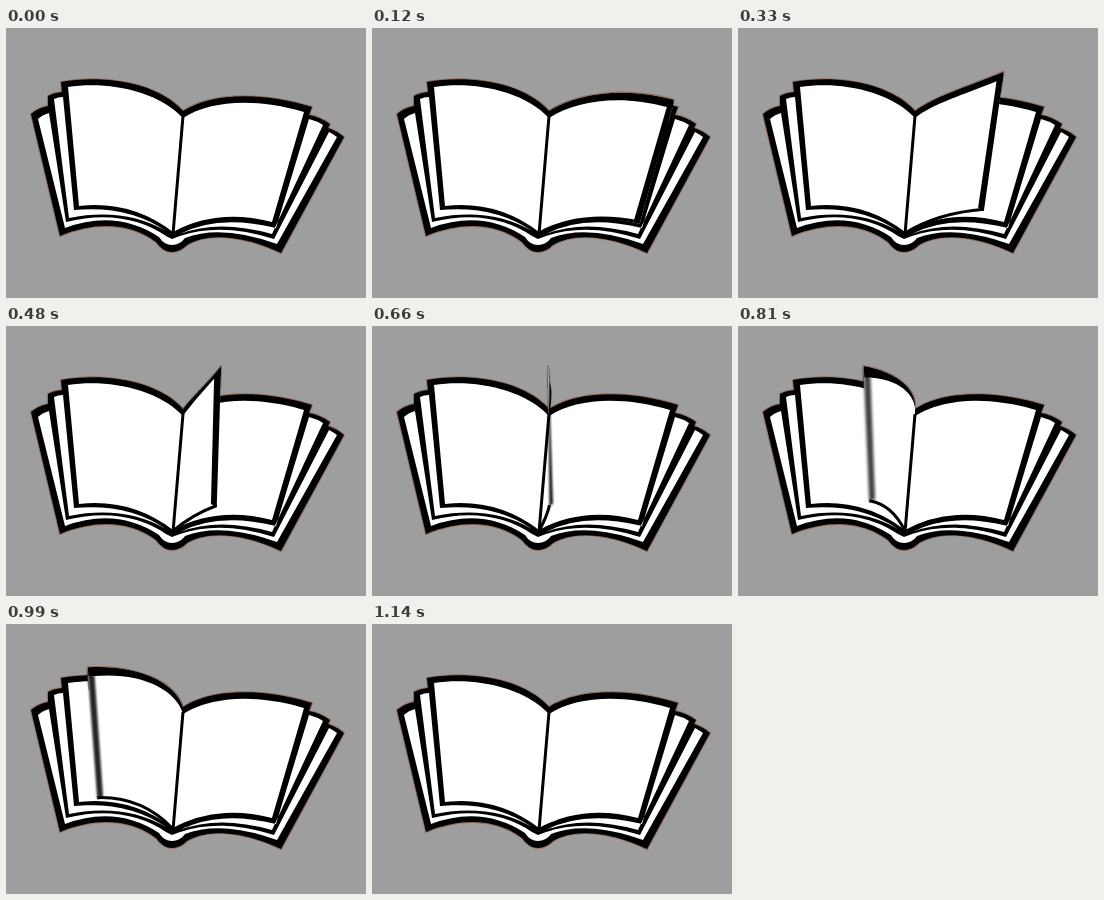
Animation of 360x270 px, one loop 1170 ms. Source, as an HTML page:

```html
<!DOCTYPE html>
<html lang="en">
<head>
<meta charset="utf-8">
<title>Turning page</title>
<style>
html, body { margin: 0; width: 100%; height: 100%; overflow: hidden; background: #9e9e9e; }
svg { display: block; width: 100vw; height: 100vh; }
.rim { stroke: #87533f; stroke-width: 2; stroke-opacity: .65; stroke-linejoin: round; paint-order: stroke; }
.paper { fill: #fff; }
</style>
</head>
<body>
<svg viewBox="0 0 360 270">
  <path class="rim" d="M25 86 Q32 80 42 78 L42 68 Q47 65 56 64 L55 54 C95 47 150 53 177 83
    C205 65 255 63 306 79 L303 87 Q314 89 324 96 L322 100 Q331 103 338 109 L275 225
    C235 206 200 205 181 217 Q174 224 166 224 Q157 224 150 214 C125 195 90 193 54 208 Z"/>
  <g class="paper">
    <path d="M32 91 Q36 87 43 85 L60 194 Q118 180 160 208 L166 211 L174 208 Q215 194 268 211
      L323 104 Q327 106 331 109 L271 216 Q215 196 179 210 Q174 217 166 217 Q158 217 153 209 Q110 181 59 200 Z"/>
    <path d="M48 71 Q52 69 57 69 L68 182 Q122 177 160 203 Q118 179 63 190 Z"/>
    <path d="M303 91 Q311 93 317 97 L266 206 Q212 191 174 206 Q212 186 270 200 Z"/>
    <path d="M62 59 C98 53 150 61 177 90 L167 204 Q125 172 73 178 Z"/>
    <path d="M177 90 C205 72 250 70 298 84 L266 194 Q211 180 167 204 Z"/>
  </g>
  <g id="page">
    <path id="rim" class="rim" fill="none"/>
    <path id="sheet" class="paper"/>
    <path id="foot" fill="none" stroke="#000" stroke-width="3"/>
    <path id="edge"/>
    <path id="band"/>
  </g>
  <path d="M175.5 88 L178.5 88 L168.5 206 L165.5 206 Z"/>
</svg>
<script>
const LOOP = 1170, STEP = 30;
// time in ms and angle of the page in degrees
const TURN = [[0, 0], [210, 26], [480, 74], [660, 92], [810, 116], [990, 142], [1140, 180]];
const $ = id => document.getElementById(id);
const draw = (id, d) => $(id).setAttribute("d", d);

function angle(t) {
  const i = TURN.findIndex(p => p[0] >= t);
  if (i < 1) return i ? Math.PI : 0;
  const [t0, a0] = TURN[i - 1], [t1, a1] = TURN[i];
  return (a0 + (a1 - a0) * (t - t0) / (t1 - t0)) * Math.PI / 180;
}

function render(t) {
  const a = angle(t), c = Math.cos(a), k = Math.abs(c), right = c > 0;
  $("page").style.display = k > .9999 ? "none" : "";

  // blend from the upright page to the flat one on its side of the spine
  const mix = (up, r, l, power = 1) => up + ((right ? r : l) - up) * k ** power;
  const curl = Math.max(0, -Math.sin(2 * a)), soft = Math.sin(a) ** 2;

  const x = 180.5 + 125.5 * c, y = mix(40, 79, 54, 6);
  const lx = x + mix(1, -36, 12, right ? 1.5 : 1), ly = mix(181, 199, 181, 6) - 6 * curl;
  const ax = mix(177, 205, 150, right ? 1 : 2) + 10 * curl, ay = mix(75, 65, 53);
  const bx = mix(178, 255, 95, right ? 1 : 1.5) + 10 * curl, by = mix(60, 58, 47) - 10 * curl;
  const fx = mix(177, 211, 125), fy = mix(191, 182, 177) - 8 * curl;

  const side = right ? -1 : 1, width = 7 * Math.min(1, k * 4);
  const ix = x + side * width, iy = y + 15 - 8 * k;
  const top = `M177 83 C${ax} ${ay} ${bx} ${by} ${x} ${y}`;
  const lower = `Q${fx} ${fy} 167 205`;
  const down = 22 / (ly - y);

  draw("rim", `${top} L${x + (lx - x) * down} ${y + 22}`);
  draw("sheet", `${top} L${lx} ${ly} ${lower} L177 87 Z`);
  draw("foot", `M${lx} ${ly - 1.5} ${lower}`);
  draw("edge", `M${x} ${y + 2} L${ix} ${iy} L${lx + side * (3 + width * .4)} ${ly - 3} L${lx} ${ly} Z`);
  $("edge").style.filter = `blur(${soft * (.8 + 1.5 * curl)}px)`;
  $("edge").style.opacity = 1 - .4 * curl * soft;
  draw("band", `${top} L${x + side} ${iy} L${ix} ${iy}
    C${bx + side * 4} ${by + 8} ${ax} ${ay + 7} 177 90 Z`);
}

const start = performance.now();
function tick() {
  const t = (performance.now() - start) % LOOP;
  render(Math.floor(t / STEP) * STEP);
  requestAnimationFrame(tick);
}
tick();
</script>
</body>
</html>
```
